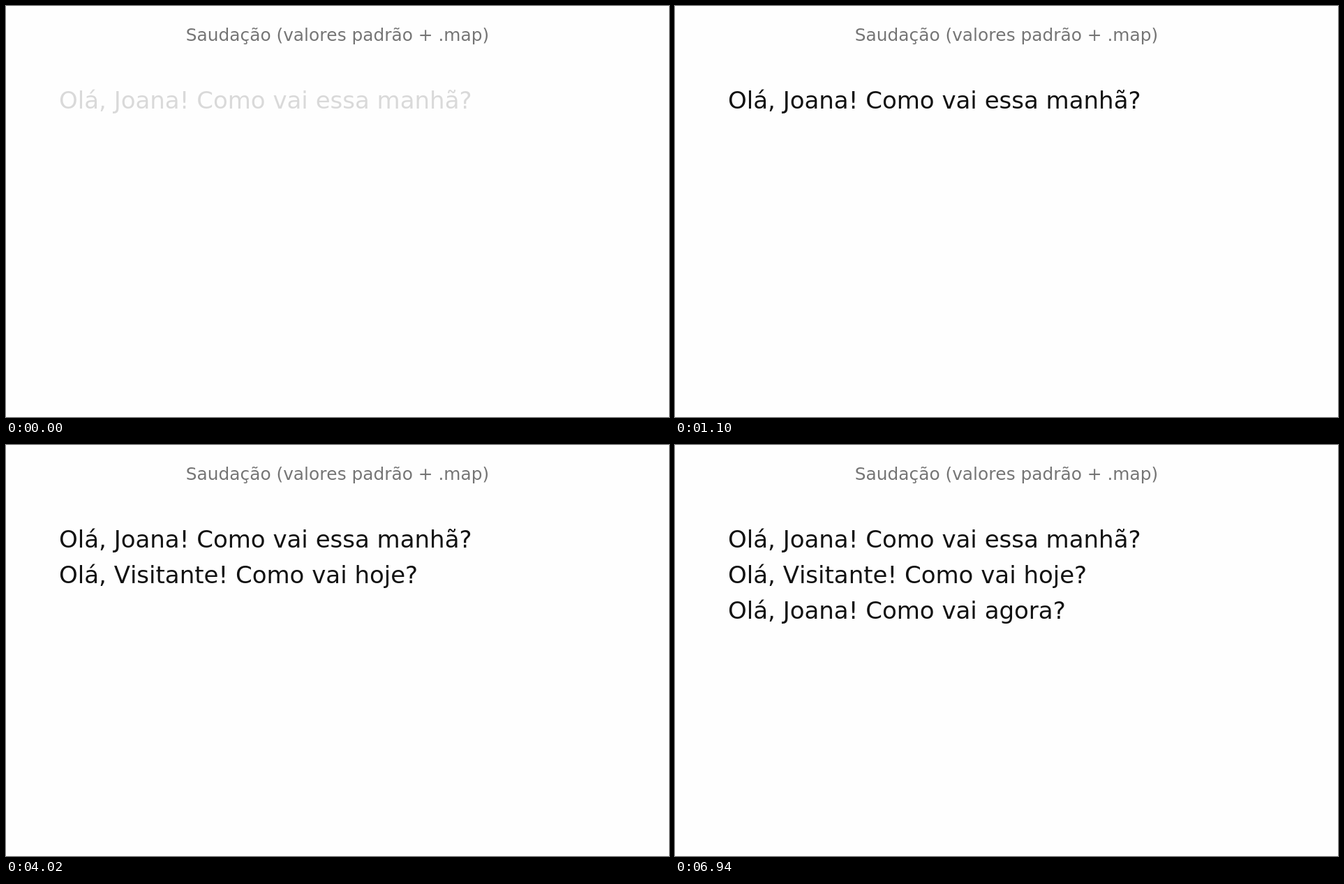
An HTML page for the animation above (8000 ms loop, 950x589 px).

```html
<!DOCTYPE html>
<html lang="pt">
<head>
<meta charset="utf-8">
<style>
  html, body { margin: 0; width: 100%; height: 100%; overflow: hidden; background: #fefefe; }
  svg { display: block; }
  text { font-family: "DejaVu Sans", sans-serif; font-kerning: none; }
  .title { font-size: 24.84px; fill: #757575; text-anchor: middle; }
  .line { font-size: 34px; fill: #111; }
</style>
</head>
<body>
<svg width="950" height="589" viewBox="0 0 950 589">
  <text class="title" x="475" y="50">Saudação (valores padrão + .map)</text>
  <text class="line" x="76" y="147">Olá, Joana! Como vai essa manhã?</text>
  <text class="line" x="76" y="198">Olá, Visitante! Como vai hoje?</text>
  <text class="line" x="76" y="249">Olá, Joana! Como vai agora?</text>
</svg>
<script>
  const LOOP = 8000, LINE_GAP = 2920, STEP = 220, LAST_STEP = 5;
  const lines = document.querySelectorAll('.line');

  // Each line fades in over a few discrete steps, slowing towards the end.
  function opacityAt(elapsed) {
    if (elapsed < 0) return 0;
    const progress = Math.min(Math.floor(elapsed / STEP), LAST_STEP) / LAST_STEP;
    return 1 - 0.85 * (1 - progress) ** 1.3;
  }

  function draw() {
    const time = performance.now() % LOOP;
    lines.forEach((line, i) => line.setAttribute('opacity', opacityAt(time - i * LINE_GAP)));
    requestAnimationFrame(draw);
  }
  draw();
</script>
</body>
</html>
```
